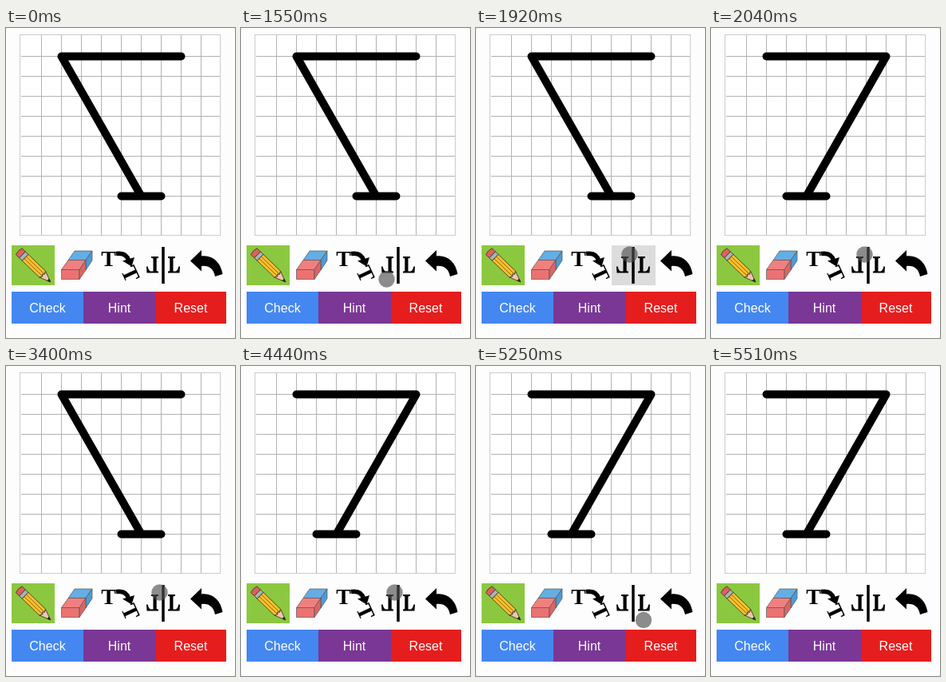
These frames come from a looping animation (287x388 px, 6910 ms). An HTML page:

```html
<!DOCTYPE html>
<html lang="en">
<head>
<meta charset="utf-8">
<title>Mirror drawing tool</title>
<style>
  html, body { margin: 0; width: 100%; height: 100%; overflow: hidden; background: #f0f0f0; }
  svg { display: block; }
  .label { font: 16px "Liberation Sans", Arial, sans-serif; fill: #fff; text-anchor: middle; }
  .letter { font: bold 28px "Liberation Serif", "Times New Roman", serif; text-anchor: middle; }
</style>
</head>
<body>
<svg width="287" height="388" viewBox="0 0 287 388">
  <rect width="287" height="388" rx="4" fill="#fdfdfd"/>

  <rect x="17.5" y="8.5" width="251" height="251" fill="#fff" stroke="#ccc"/>
  <path id="grid" stroke="#b2b2b2"/>
  <path id="figure" d="M219.5 35.5H69.5L169.5 210.5M144.5 210.5H194.5" fill="none"
        stroke="#000" stroke-width="10" stroke-linecap="round" stroke-linejoin="round"/>

  <rect x="7" y="272" width="54" height="50" fill="#8bc83f"/>
  <rect id="pressed" x="170" y="272" width="55" height="50" fill="#dcdcdc"/>

  <!-- pencil, drawn along its own axis -->
  <g transform="translate(15.5 279) rotate(44)" stroke="#333" stroke-width=".8" stroke-linejoin="round">
    <path d="M1 -5.5H7V5.5H1Q-1 0 1 -5.5Z" fill="#e0605c"/>
    <path d="M7 -5.5H12V5.5H7Z" fill="#a9b4b8"/>
    <path d="M12 -5.5H42L44 -2L42 0L44 2L42 5.5H12Z" fill="#fbc02d"/>
    <path d="M12 -1.8H43M12 1.8H43" stroke="#7a5200"/>
    <path d="M42 -5.5L56 0L42 5.5L44 2L42 0L44 -2Z" fill="#f3c6a5"/>
    <path d="M52 -1.6L56 0L52 1.6Z" fill="#222"/>
  </g>

  <!-- eraser -->
  <g stroke="#555" stroke-width=".7" stroke-linejoin="round">
    <path d="M86 279H108L100 290.5H78Z" fill="#64aee4"/>
    <path d="M100 290.5L108 279V291L100 303Z" fill="#4f9ad6"/>
    <path d="M78 290.5H100L92 302.5H69.5Z" fill="#f08080"/>
    <path d="M69.5 302.5H92V314.5H69.5Z" fill="#ec7272"/>
    <path d="M92 302.5L100 290.5V303L92 314.5Z" fill="#dd6464"/>
  </g>

  <!-- rotate -->
  <text class="letter" x="128.5" y="297.5">T</text>
  <text class="letter" transform="translate(155.5 308) rotate(65)" y="9">T</text>
  <path d="M138 282.5Q151 280.5 153.5 291" fill="none" stroke="#000" stroke-width="5.5"/>
  <path d="M146 291.5L161 287L157.5 298.5Z"/>

  <!-- mirror -->
  <path d="M197 274V320" stroke="#000" stroke-width="3.5"/>
  <path id="ell" d="M203 286H212V287.8L209.5 288.5V304.5H212C214.5 304.5 215.5 302 216.3 298.5H218L217.5 306.5H203V304.8L205.3 304V288.5L203 287.8Z"/>
  <use href="#ell" transform="matrix(-1 0 0 1 394 0)"/>

  <!-- undo -->
  <path d="M231 291.5L245 278V285.5C260 284 269 294 271.5 308L262 311C260 301 254 297 245 298V304.5Z"/>

  <rect x="7" y="330" width="90" height="40" fill="#4487f0"/>
  <rect x="97" y="330" width="91" height="40" fill="#7a3795"/>
  <rect x="188" y="330" width="88" height="40" fill="#e51d1d"/>
  <text class="label" x="52" y="356">Check</text>
  <text class="label" x="142" y="356">Hint</text>
  <text class="label" x="231.5" y="356">Reset</text>

  <circle id="pointer" r="10.2" fill="#505050" fill-opacity=".65"/>
</svg>
<script>
const LOOP = 6910;
const el = id => document.getElementById(id);
const within = (t, from, to) => t >= from && t < to;

let gridPath = "";
for (let i = 1; i < 10; i++)
  gridPath += `M${19.5 + 25 * i} 9V259M19 ${10.5 + 25 * i}H268`;
el("grid").setAttribute("d", gridPath);

// [start time, x, y]; no position means the pointer is hidden
const pointerStops = [
  [0], [1550, 182.5, 314.5], [1670, 192.5, 283.5],
  [5250, 210, 318], [5370, 226.5, 351.5], [5510]
];
const flips = [2040, 3400, 4440];

function draw(now) {
  const t = now % LOOP;
  const flipped = flips.filter(time => t >= time).length % 2;
  el("figure").setAttribute("transform", flipped ? "matrix(-1 0 0 1 289 0)" : "");

  const pressed = within(t, 1920, 2040) || within(t, 3280, 3400);
  el("pressed").setAttribute("visibility", pressed ? "visible" : "hidden");

  const [, x, y] = pointerStops.findLast(([start]) => t >= start);
  const pointer = el("pointer");
  pointer.setAttribute("visibility", x === undefined ? "hidden" : "visible");
  pointer.setAttribute("cx", x ?? 0);
  pointer.setAttribute("cy", y ?? 0);
}

const began = performance.now();
function tick() {
  draw(performance.now() - began);
  requestAnimationFrame(tick);
}
tick();
</script>
</body>
</html>
```
